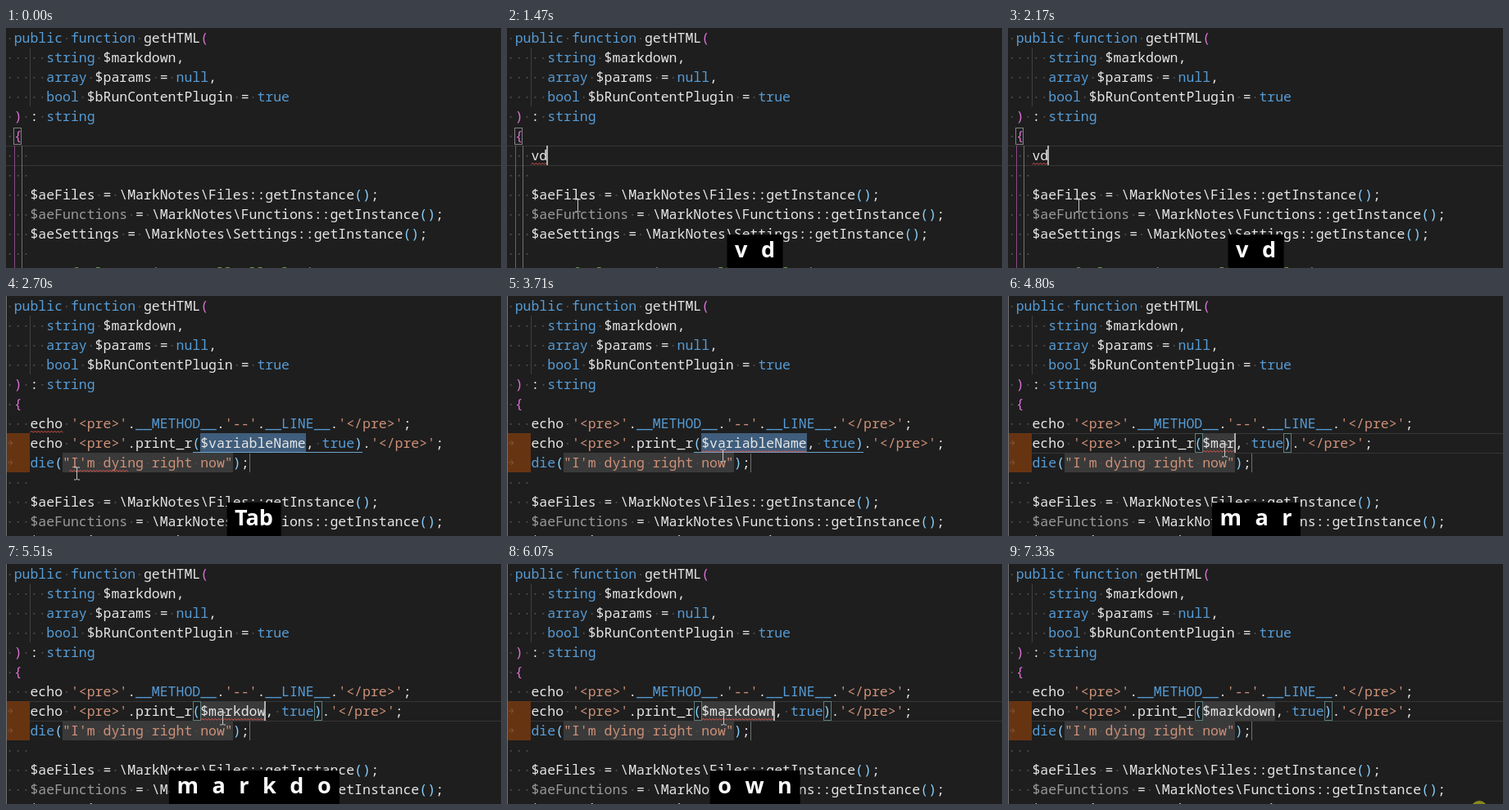
These frames come from a looping animation (604x294 px, 7.48 s). An HTML page:

```html
<!DOCTYPE html>
<html lang="en">
<head>
<meta charset="utf-8">
<title>Snippet expansion</title>
<style>
  html, body { margin: 0; width: 100%; height: 100%; overflow: hidden; background: #1e1e1e; }
  #stage { position: relative; width: 604px; height: 294px; overflow: hidden; background: #1e1e1e; }
  #stage > * { position: absolute; }
  pre { left: -.2px; top: 0; margin: 0; color: #e6e6e6;
        font: 500 16.493px/24px "Noto Sans Mono", "DejaVu Sans Mono", monospace;
        font-variant-ligatures: none; }
  pre div { height: 24px; }
  .key { color: #569cd6; }
  .str { color: #ce9178; }
  .note { color: #6a9955; }
  .outer { color: #da70d6; }
  .inner { color: #87cefa; }
  .dim { opacity: .62; }
  .dot { color: #4a4a4a; }
  .hold { display: inline-block; height: 24px; vertical-align: top; background: #3a3a3a; }
  .picked { background: #3f5d7c; }
  .box { box-sizing: border-box; width: 10px; height: 21px; border: 1px solid #828282; }
  .tint { border-color: #5c7f80; height: 24px; }
  #line { left: 0; width: 604px; height: 25px; box-sizing: border-box; border: solid #363636; border-width: 1px 0; }
  #tabs { left: 0; top: 168px; width: 29px; height: 48px; background: #673412; }
  #caret { width: 2px; height: 24px; background: #aeafad; }
  #keys { left: 302.5px; top: 253px; height: 41px; padding: 0 10px; transform: translateX(-50%);
          background: #000; color: #fff; white-space: pre; word-spacing: 9.5px;
          font: 700 27px/35px "Open Sans", "Noto Sans", sans-serif; }
  svg { left: 0; top: 0; fill: none; }
</style>
</head>
<body>
<div id="stage">
  <div id="line"></div>
  <div id="tabs"></div>
  <pre id="before"></pre>
  <pre id="after"></pre>
  <div id="brace" class="box" style="left:9px;top:122px"></div>
  <div id="open" class="box tint" style="left:228px;top:168px"></div>
  <div id="close" class="box tint" style="top:168px"></div>
  <svg width="604" height="294">
    <path d="M29.5 24V96" stroke="#404040"/>
    <g id="guides">
      <path d="M10.5 144V294" stroke="#8a4a88"/>
      <path d="M19.5 144V294" stroke="#707070"/>
    </g>
    <g id="marks">
      <path d="M.5 0V294" stroke="#707070"/>
      <path d="M2 180h6m-3-3l3 3-3 3M2 204h6m-3-3l3 3-3 3" stroke="#80573c"/>
      <path d="M297.5 193V216" stroke="#707070"/>
    </g>
    <path id="scope" d="M228 191.5H435" stroke="#6fa5c9"/>
    <path id="waves" stroke="#e5534b"/>
    <path id="mouse" d="M-3.5 -7.5h2.5l1 1 1-1h2.5M0 -6.5V6.5M-3.5 7.5h2.5l1-1 1 1h2.5" stroke="#c8c8c8"/>
    <circle id="spot" cx="575" cy="300" r="10" fill="#878c1e"/>
  </svg>
  <div id="caret"></div>
  <div id="keys"></div>
</div>
<script>
const LOOP = 7480, CHAR = 9.896, ROW = 24;
const $ = id => document.getElementById(id);
const colX = col => 9.7 + col * CHAR;

const head = [
  'public function getHTML(',
  '    string $markdown,',
  '    array $params = null,',
  '    bool $bRunContentPlugin = true',
  ') : string',
  '{'
];
const services = ['Files', 'Functions', 'Settings']
  .map(name => `  $ae${name} = \\MarkNotes\\${name}::getInstance();`);
const snippet = [
  "  echo '<pre>'.__METHOD__.'--'.__LINE__.'</pre>';",
  "  echo '<pre>'.print_r(@, true).'</pre>';",
  '  die("I\'m dying right now");'
];

const token = /(\/\/.*)|("[^"]*")|('[^']*')|\b(public|function|string|array|bool|null|true|die|__METHOD__|__LINE__)\b|([(){])|(\$aeFunctions)|(@)/g;
const span = (cls, text) => `<span class="${cls}">${text}</span>`;

function paint(line, row) {
  const bracket = row < 6 ? 'outer' : 'inner';
  const indent = (' ' + line).match(/^ */)[0].length;
  // Rows 7 and 8 of the snippet are indented with a tab.
  const tabbed = snippet.indexOf(line) > 0;
  const body = line.trim().replace(/</g, '&lt;').replace(token,
    (all, note, quoted, str, key, br, dim, slot) =>
      note ? span('note', note) :
      quoted ? span('str hold', quoted) :
      str ? span('str', str) :
      key ? span('key', key) :
      br ? span(bracket, br) :
      dim ? span('dim', dim) : '<span id="name" class="hold"></span>');
  // Split at tags so only spaces in the text become dots.
  const dotted = body.replace(/(<[^>]*>)| /g, (all, tag) => tag || span('dot', '·'));
  const lead = tabbed ? ' '.repeat(indent) : span('dot', '·'.repeat(indent));
  return `<div>${lead}${dotted}</div>`;
}
const fill = (id, lines) => { $(id).innerHTML = lines.map(paint).join(''); };

fill('before', [...head, '  ', '  ', ...services, '  ', '  // Default settings, call all plugins']);
fill('after', [...head, ...snippet, '  ', ...services]);
const typed = document.createElement('span');
$('before').children[6].append(typed);

// Step tracks: the last entry at or before the time holds.
const step = (track, t) => track.reduce((v, [at, next]) => t >= at ? next : v, track[0][1]);

const EXPAND = 2250, TYPE = 4650;
const abbr = [[0, ''], [1220, 'v'], [1380, 'vd']];
const names = [[0, '$variableName'], [TYPE, '$m'], [4720, '$ma'], [4800, '$mar'], [4960, '$mark'],
  [5120, '$markd'], [5430, '$markdo'], [5510, '$markdow'], [5590, '$markdown']];
const keys = [[0, ''], [1300, 'v'], [1470, 'v d'], [2330, 'Tab'], [3480, ''],
  [4720, 'm a'], [4800, 'm a r'], [5120, 'm a r k'], [5430, 'm a r k d'], [5510, 'm a r k d o'],
  [5590, 'r k d o w n'], [5660, 'k d o w n'], [5840, 'd o w n'], [6070, 'o w n'], [6620, '']];
const fade = [[0, 1], [3180, .75], [3260, .5], [3340, .25], [3480, 1], [6390, .75], [6470, .5], [6540, .25], [6620, 1]];
const blink = [[0, 0], [530, 1], [1940, 0], [2170, 1], [2700, 0], [3180, 1], [3710, 0],
  [3950, 1], [4480, 0], [TYPE, 1], [6220, 0], [6690, 1], [7250, 0]];
const path = [[130, 289, 250], [380, 54, 182], [910, 54, 182], [990, 86, 217], [3180, 86, 217],
  [3560, 263, 195], [3710, 263, 195], [3950, 264, 189], [6390, 264, 189], [6620, 500, 306]];

function mouseAt(t) {
  const i = path.findIndex(p => p[0] > t);
  if (i < 1) return null;
  const [t0, x0, y0] = path[i - 1], [t1, x1, y1] = path[i];
  const k = (t - t0) / (t1 - t0);
  return [x0 + (x1 - x0) * k, y0 + (y1 - y0) * k];
}

function wave(col, row, count) {
  const x = colX(col), y = (row + 1) * ROW - .7;
  return `M${x} ${y}` + 'l2 -2l2 2'.repeat(Math.round(count * CHAR / 4));
}

const show = (id, on) => { $(id).style.display = on ? '' : 'none'; };
const move = (id, x, y) => { $(id).style.left = x + 'px'; $(id).style.top = y + 'px'; };

function draw(t) {
  const open = t >= EXPAND, typing = t >= TYPE;
  const word = step(abbr, t), name = step(names, t);
  const caretCol = open ? 23 + name.length : 2 + word.length;
  const row = open ? 7 : 6;

  for (const id of ['before', 'guides', 'brace']) show(id, !open);
  for (const id of ['after', 'marks', 'tabs']) show(id, open);
  show('line', !open || typing);
  $('line').style.top = row * ROW + 'px';
  typed.textContent = word;
  $('name').textContent = name;
  $('name').classList.toggle('picked', !typing);

  show('scope', t >= 2470 && !typing);
  show('open', typing);
  show('close', typing);
  move('close', Math.round(colX(caretCol + 6)), 168);

  let waves = '';
  if (!open && t >= 1380) waves = wave(2, 6, 2);
  else if (t >= 2470 && t < 3020) waves = wave(2, 6, 4) + wave(6.8, 8, 7.2);
  else if (t >= 3020 && t < 6390) waves = wave(23, 7, name.length);
  $('waves').setAttribute('d', waves);

  show('caret', step(blink, t));
  move('caret', Math.floor(colX(caretCol) - .7), row * ROW);

  const text = step(keys, t);
  show('keys', text);
  $('keys').textContent = text;
  $('keys').style.opacity = step(fade, t);

  const at = mouseAt(t);
  show('mouse', at);
  if (at) $('mouse').setAttribute('transform', `translate(${at.map(v => Math.round(v) + .5)})`);
  show('spot', t >= 7330);
}

const start = performance.now();
function tick() {
  draw((performance.now() - start) % LOOP);
  requestAnimationFrame(tick);
}
tick();
</script>
</body>
</html>
```
